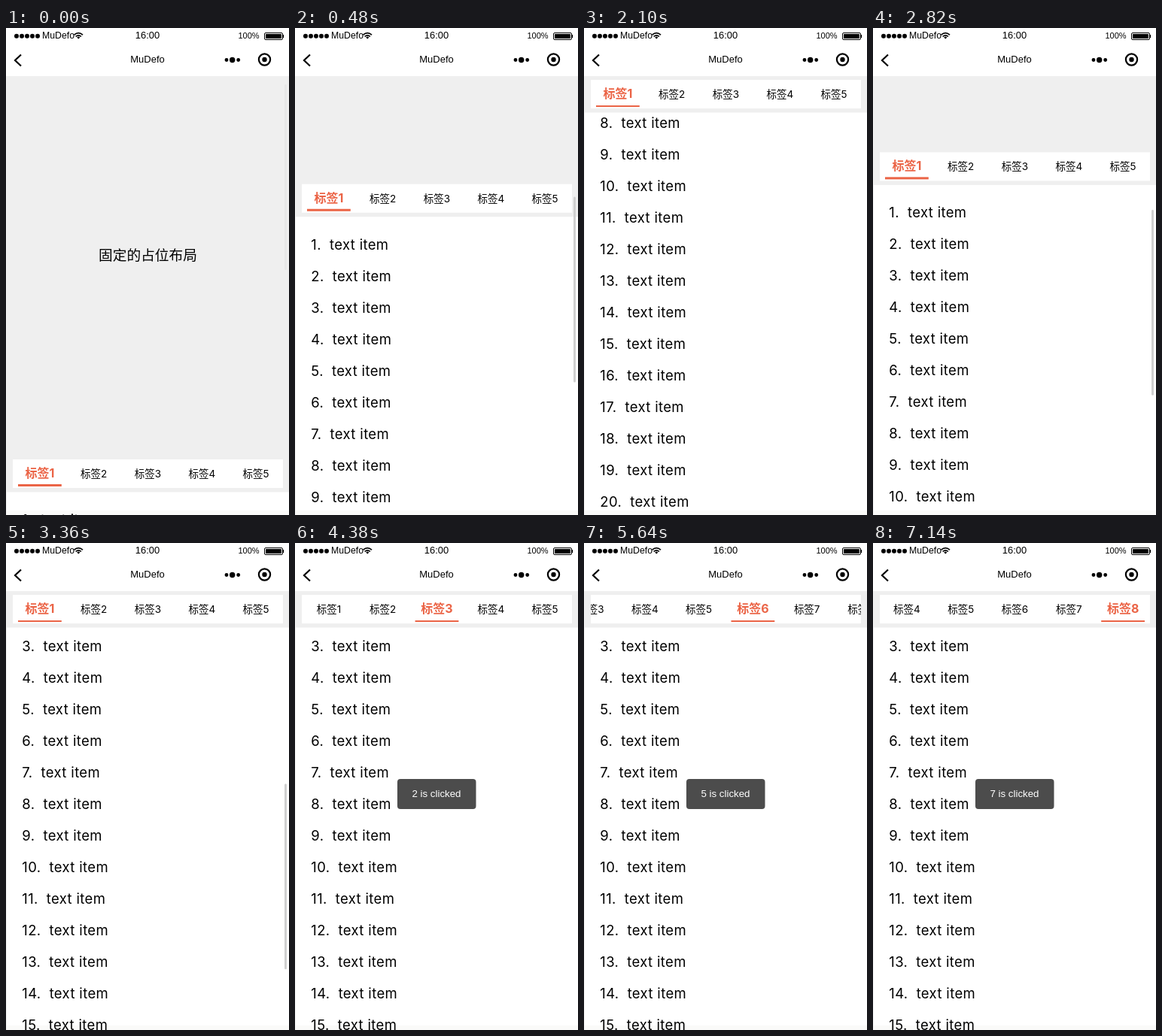
An HTML page for the animation above (7.2 s loop, 376 px wide and 648 px high).

```html
<!DOCTYPE html>
<html lang="zh">
<head>
<meta charset="utf-8">
<style>
  html, body { margin: 0; width: 100%; height: 100%; overflow: hidden; background: #fff; }
  svg { display: block; width: 376px; height: 648px; }
  text { font-family: Inter, "Noto Sans CJK SC", "Noto Sans CJK", sans-serif; fill: #000; }
  .mid { text-anchor: middle; }
  .sys { font-family: "Liberation Sans", Arial, sans-serif; }
  .item { font-size: 18.5px; letter-spacing: .35px; white-space: pre; }
  .tab { font-size: 13.5px; text-anchor: middle; }
  .tab.on { font-size: 16px; font-weight: 700; fill: #eb6446; }
  .line { fill: none; stroke: #000; }
</style>
</head>
<body>
<svg viewBox="0 0 376 648">
  <clipPath id="strip"><rect x="9" y="0" width="359" height="60"/></clipPath>

  <rect y="642" width="376" height="6" fill="#fafaf9"/>
  <g id="page">
    <rect y="64" width="376" height="553" fill="#efefef"/>
    <text class="mid" x="188.5" y="309" font-size="18.7">固定的占位布局</text>
    <g id="list"></g>
  </g>
  <rect y="64" width="1" height="584" fill="#f0f0f0"/>

  <g id="bar">
    <rect width="376" height="48.5" fill="#efefef"/>
    <rect x="9" y="5" width="359" height="38" fill="#fff"/>
    <g clip-path="url(#strip)">
      <g id="tabs"><rect id="mark" width="57.8" fill="#eb6446"/></g>
    </g>
  </g>
  <rect id="thumb" x="370" width="3" height="247" rx="1.5" fill="#cfcfcf"/>

  <rect width="376" height="64" fill="#fff"/>
  <g id="signal"></g>
  <text class="sys" x="48" y="14" font-size="12.3">MuDefo</text>
  <g class="line" stroke-width="1.7">
    <path d="M90.5 9.2Q96.3 4.2 102 9.2M92.6 11.4Q96.3 8.2 99.9 11.4"/>
    <path d="M94.2 12.4Q96.3 10.8 98.4 12.4L96.3 14.6Z" fill="#000" stroke="none"/>
  </g>
  <text class="sys mid" x="188" y="14" font-size="12.9">16:00</text>
  <text class="sys" x="308.5" y="13.8" font-size="11">100%</text>
  <rect class="line" x="343.5" y="6.5" width="24" height="9" rx="1.5"/>
  <rect x="345" y="8" width="21" height="6" rx=".5"/>
  <rect x="368" y="9" width="1" height="4"/>

  <path class="line" d="M20 35.5L12 43L20 50.5" stroke-width="2.2"/>
  <text class="sys mid" x="188" y="46" font-size="13">MuDefo</text>
  <circle cx="293" cy="42.5" r="2.4"/>
  <circle cx="300.7" cy="42.5" r="3.7"/>
  <circle cx="308.7" cy="42.5" r="2.4"/>
  <circle class="line" cx="343.5" cy="42" r="7.6" stroke-width="2.2"/>
  <circle cx="343.5" cy="42" r="3.2"/>

  <g id="toast">
    <rect x="136" y="314" width="104.5" height="40" rx="4" fill="#4c4c4c"/>
    <text id="note" class="sys mid" x="188" y="338" font-size="13.3" style="fill:#fff"></text>
  </g>
</svg>
<script>
const LOOP = 7200, STEP = 60, PITCH = 71.8;
const $ = id => document.getElementById(id);

function add(parent, tag, attrs, text = "") {
  const el = document.createElementNS("http://www.w3.org/2000/svg", tag);
  for (const k in attrs) el.setAttribute(k, attrs[k]);
  el.textContent = text;
  return parent.appendChild(el);
}

// [time, value] keys joined by smooth steps
function track(keys, t) {
  let [t0, v0] = keys[0];
  for (const [t1, v1] of keys) {
    if (t < t1) {
      const p = Math.max(0, (t - t0) / (t1 - t0));
      return v0 + (v1 - v0) * p * p * (3 - 2 * p);
    }
    [t0, v0] = [t1, v1];
  }
  return v0;
}

const scrollKeys = [[0, 0], [900, 666], [1200, 666], [1740, 822], [2400, 822],
                    [2760, 400], [3240, 601]];
const thumbKeys = [[0, .25], [180, 1], [960, 1], [1200, .25], [1300, 1], [1740, 1], [2040, 0],
                   [2400, 0], [2460, 1], [3420, 1], [3720, 0]];
// [time, tab index]
const clicks = [[3960, 1], [4320, 2], [4680, 3], [5100, 4], [5520, 5], [6000, 6], [6480, 7]];

// each tap brings its tab to the middle of the strip
const slideTo = i => Math.min(3, Math.max(0, i - 2)) * PITCH;
const slideKeys = [[0, 0]];
for (const [at, i] of clicks) slideKeys.push([at, slideTo(i - 1)], [at + 240, slideTo(i)]);

for (let i = 0; i < 5; i++) add($("signal"), "circle", { cx: 14 + 7 * i, cy: 10.7, r: 3 });
for (let i = 1; i <= 20; i++)
  add($("list"), "text", { class: "item", x: 21.3, y: 619 + 42 * i }, i + ".\u00a0\u00a0text item");
const tabX = i => 44.9 + i * PITCH;
const tabs = [...Array(8).keys()].map(i =>
  add($("tabs"), "text", { x: tabX(i), y: 29 }, "标签" + (i + 1)));

const move = (id, x, y) => $(id).setAttribute("transform", `translate(${x} ${y})`);

function draw(ms) {
  const t = Math.floor(ms % LOOP / STEP) * STEP;
  const scroll = track(scrollKeys, t);
  const stuck = scroll >= 505;
  move("page", 0, -scroll);
  move("bar", 0, stuck ? 64 : 569 - scroll);
  $("thumb").setAttribute("y", 75 + scroll * .408);
  $("thumb").setAttribute("opacity", track(thumbKeys, t));

  const tapped = clicks.filter(([at]) => t >= at).pop();
  const active = tapped ? tapped[1] : 0;
  tabs.forEach((el, i) => el.setAttribute("class", i === active ? "tab on" : "tab"));
  move("tabs", -track(slideKeys, t), 0);
  $("mark").setAttribute("x", tabX(active) - 28.9);
  $("mark").setAttribute("y", stuck ? 39 : 38);
  $("mark").setAttribute("height", stuck ? 2 : 3);

  $("toast").style.display = tapped ? "" : "none";
  $("note").textContent = active + " is clicked";
}

const start = performance.now();
function loop() {
  draw(performance.now() - start);
  requestAnimationFrame(loop);
}
loop();
</script>
</body>
</html>
```
